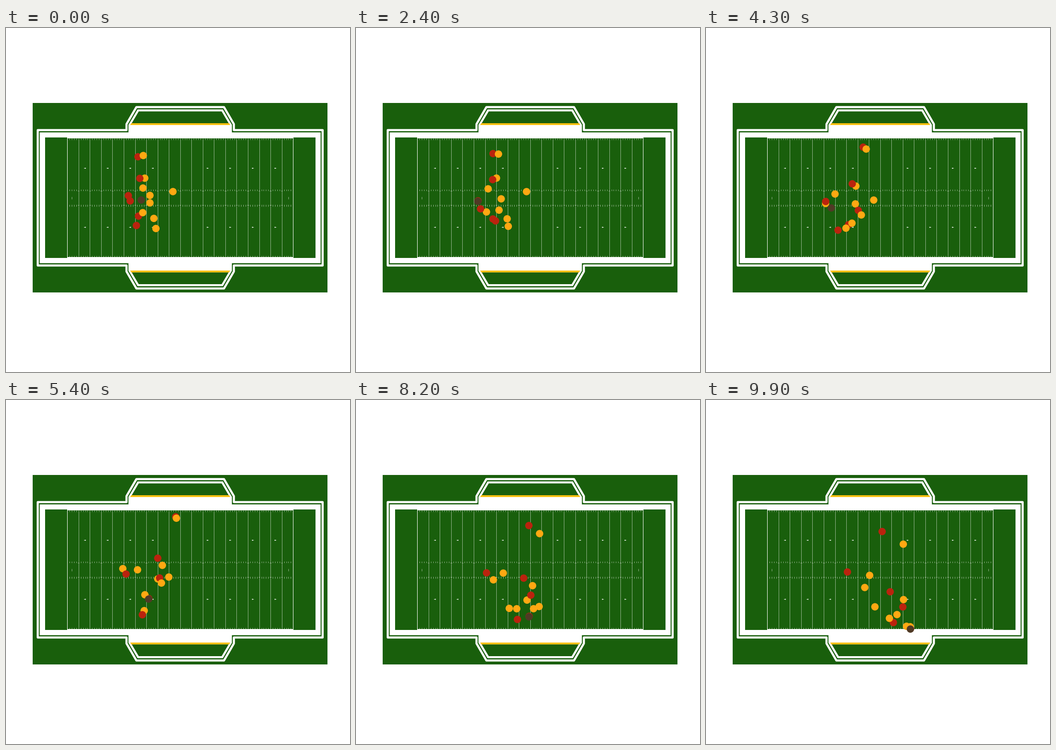
A matplotlib script that plays this animation: 748 by 748 pixels, repeating every 10 s.

```python
import numpy as np
import matplotlib.pyplot as plt
from matplotlib.animation import FuncAnimation
from matplotlib.collections import LineCollection
from matplotlib.patches import Circle, Polygon

SIZE, DPI = 748, 100
PX = 72 / DPI
CX, CY = 378.75, 369.2
YD = 4.91
GREEN, YELLOW = "#195f0c", "#fdc010"
GOLD, RED, BROWN = "#ffa812", "#ba230e", "#503a25"
FRAMES, STEP = 100, 100

fig = plt.figure(figsize=(SIZE / DPI, SIZE / DPI), dpi=DPI, facecolor="white")
ax = fig.add_axes([0, 0, 1, 1])
ax.set_xlim(0, SIZE)
ax.set_ylim(SIZE, 0)
ax.axis("off")


# ---- field ----
def poly(pts, color, **kw):
    ax.add_patch(Polygon(pts, closed=True, **{"fc": color, "ec": "none", **kw}))


def box(half_w, half_h, color, cx=CX):
    poly([(cx + i * half_w, CY + j * half_h)
          for i, j in ((-1, -1), (1, -1), (1, 1), (-1, 1))], color)


def flip_x(pts):
    return [(2 * CX - x, y) for x, y in pts]


def flip_y(pts):
    return [(x, 2 * CY - y) for x, y in pts]


def border(*corner):
    """Mirror the upper left part of an outline into all four corners."""
    top = list(corner) + flip_x(corner)[::-1]
    return top + flip_y(top)[::-1]


def lines(segs, width=YD / 9):
    ax.add_collection(LineCollection(segs, colors="white", linewidths=width * PX,
                                     capstyle="butt"))


box(320.4, 205.8, GREEN)
poly(border((69, 222), (262, 222), (262, 209), (283.5, 172)), "none",
     ec="white", lw=4.6 * PX, joinstyle="round")
poly(border((73.4, 227), (266.3, 227), (266.3, 210.5), (286, 177)), "white")

bench = [(273.3, 207.2), (288.6, 181.4)]
stripe = [(270, 211), (272.3, 207)]
for side in (list, flip_y):
    poly(side(bench + flip_x(bench)[::-1]), GREEN)
    poly(side(stripe + flip_x(stripe)[::-1]), YELLOW)

for side in (-1, 1):
    box(24.1, 130.8, GREEN, CX + side * 55 * YD)
box(50 * YD - 0.6, 128.9, GREEN)

yard = [CX + 5 * YD * k for k in range(-9, 10)]
lines([[(x, 240), (x, 498.4)] for x in yard])

marks = [[(x - 1.7, 353.9), (x + 1.7, 353.9)] for x in yard]
for n in range(1, 100):
    if n % 5:
        x = CX + YD * (n - 50)
        marks += [[(x, y), (x, y + 3.2)] for y in (240, 350.9)]
lines(marks + [flip_y(m) for m in marks])

spot = [(CX - 48 * YD, CY - 2.5), (CX - 48 * YD, CY + 2.5)]
lines([spot, flip_x(spot)])

for k in range(4):
    x = 171.3 + 10 * YD * k
    arrow = [(x - 2.4, 305), (x + 2.2, 303.8), (x + 2.2, 306.2)]
    for a in (arrow, flip_x(arrow)):
        poly(a, "white")
        poly(flip_y(a), "white")

# ---- motion ----
SNAP, HELD, THROW, CATCH, TURN, END = 1.15, 1.85, 4.1, 4.9, 5.4, 9.9
ROUTE = np.array([0, 1.4, 3.3, TURN])
RUN_EASE = np.array([1.5, 1.1])   # downfield speed builds up, sideways stays even
HAND = np.array([-0.4, 1.1])


class Player:
    """Lines up, runs a smooth route, then turns to follow the catch.

    drift is the shift before the snap; via bends the route.
    """

    def __init__(self, color, start, turn, end, via=None, drift=(0, 0)):
        self.color = color
        start, self.turn, self.end = (np.array(p, float) for p in (start, turn, end))
        ready = start + drift
        if via is None:
            via = ready + 0.37 * (self.turn - ready)
        self.p = np.array([start, ready, via, self.turn])
        self.v = np.gradient(self.p, ROUTE, axis=0)
        self.v[-1] *= 0.5

    def __call__(self, t):
        if t >= TURN:
            s = (t - TURN) / (END - TURN)
            return self.turn + (self.end - self.turn) * s ** RUN_EASE
        i = np.searchsorted(ROUTE, t, "right") - 1
        h = ROUTE[i + 1] - ROUTE[i]
        s = (t - ROUTE[i]) / h
        (a, b), (va, vb) = self.p[i:i + 2], self.v[i:i + 2] * h
        return (a + (b - a) * s * s * (3 - 2 * s)
                + s * (1 - s) * ((1 - s) * va - s * vb))


passer = Player(RED, (270, 376), (261, 378.5), (307.5, 374), via=(261, 376))
catcher = Player(RED, (288, 409), (310.5, 431.8), (444.8, 497), via=(307, 422))

# bottom to top
players = [
    Player(GOLD, (301.7, 326.5), (340, 359.5), (429.5, 434), via=(312, 329.5)),
    Player(GOLD, (313, 364), (330, 389), (415.3, 466.6), drift=(0, 3.8)),
    Player(RED, (287, 280), (369, 254), (383, 286), via=(314, 265.5)),
    Player(RED, (291, 327), (330, 344), (400.5, 417)),
    catcher,
    Player(RED, (283.5, 429.5), (334, 387), (428, 450), via=(323, 408)),
    Player(GOLD, (297.3, 401.5), (254, 366.7), (345.2, 407.7), via=(269.5, 395.5)),
    Player(GOLD, (313, 380.3), (300.5, 458), (367.3, 449.7), drift=(0, 3.8)),
    passer,
    Player(RED, (266, 364.5), (296.5, 467), (407.5, 484), drift=(0, 13.5)),
    Player(GOLD, (297.8, 348), (286, 369.2), (355.8, 381.3), via=(278.5, 353)),
    Player(GOLD, (298.5, 277.3), (370.5, 257), (429, 313.5)),
    Player(GOLD, (326, 436), (302, 423.5), (398.8, 474.7), via=(330.5, 426.5),
           drift=(2, 0)),
    Player(GOLD, (321.5, 414), (338, 398), (436, 492), via=(335.5, 414)),
    Player(GOLD, (363, 355.7), (354, 385), (444, 493), via=(373, 363),
           drift=(2.7, -4.3)),
]


def ball(t):
    """Snapped to the passer, thrown, then carried by the catcher."""
    if t < HELD:
        s = max(0, (t - SNAP) / (HELD - SNAP))
        return (1 - s) * np.array([294, 374]) + s * (passer(HELD) + HAND)
    s = np.clip((t - THROW) / (CATCH - THROW), 0, 1)
    src, dst = passer(min(t, THROW)), catcher(max(t, CATCH))
    return src + s * (dst - src) + HAND


def dot(color, z):
    return ax.add_patch(Circle((0, 0), 8, fc=color, ec="none", zorder=z))


movers = [(dot(p.color, 10 + z), p) for z, p in enumerate(players)]
movers.append((dot(BROWN, 40), ball))


def update(i):
    t = i * STEP / 1000
    for patch, path in movers:
        patch.center = tuple(path(t))
    return [patch for patch, _ in movers]


anim = FuncAnimation(fig, update, frames=FRAMES, interval=STEP, repeat=True,
                     repeat_delay=0, blit=False)
plt.show()
```
